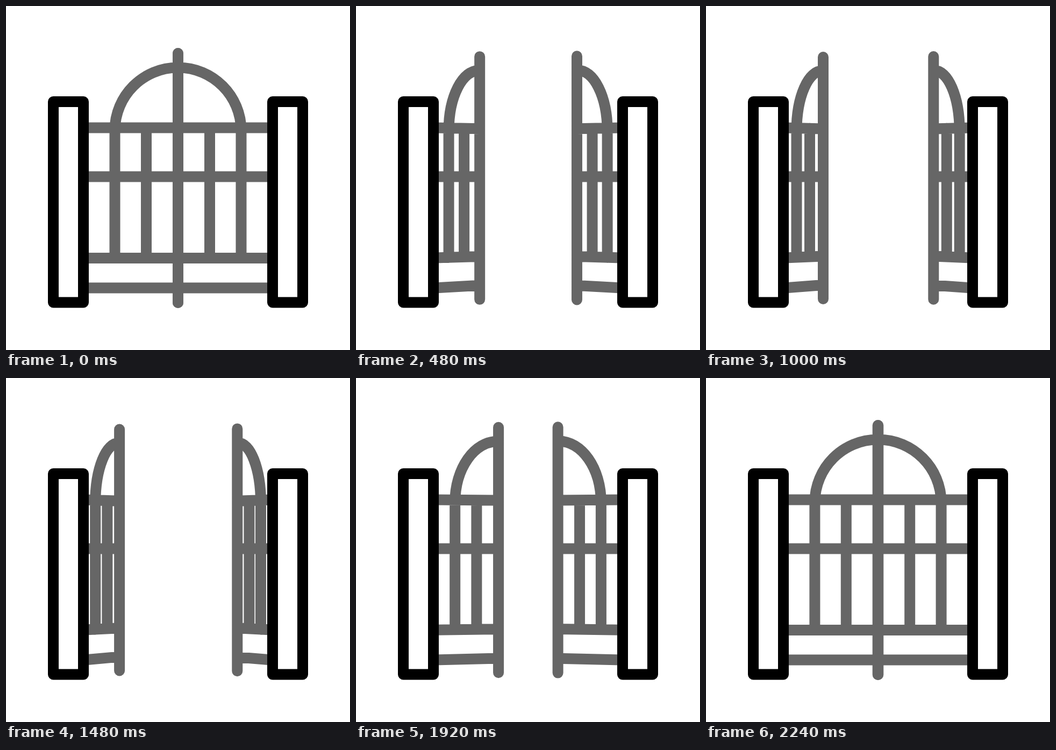
An HTML page for the animation above (2.28 s loop, 640 px wide and 640 px high).

```html
<!DOCTYPE html>
<html lang="en">
<head>
<meta charset="utf-8">
<title>Gate</title>
<style>
  html, body {
    margin: 0;
    width: 100%;
    height: 100%;
    overflow: hidden;
    background: #fff;
  }
  svg {
    display: block;
    width: 100vw;
    height: 100vh;
  }
  path, rect {
    fill: none;
    stroke-width: 20;
    stroke-linecap: round;
    stroke-linejoin: round;
  }
  rect { stroke: #000; }

  /* Order of parts: post, four rails, two pickets, arch */
  .gate {
    stroke: #666;
    d: var(--shut);
    animation: swing 2280ms infinite;
  }
  .left {
    --shut: path("M320 88V552 M146 226.5L320 226.5 M146 317.5L320 317.5 M146 469L320 469 M146 524.5L320 524.5 M202.5 226.5L202.5 469 M261 226.5L261 469 M202.5 232C202.5 167.1 255.1 114.5 320 114.5");
    --open: path("M218 95V545 M146 226.5L218 228.5 M146 317.5L218 317.5 M146 468.5L218 465.5 M146 524.5L218 519 M168.5 227.2L168.5 467.8 M193 227.8L193 466.6 M168.5 232.6C168.5 168.6 190.7 118.3 218 120.7");
  }
  .right {
    --shut: path("M320 88V552 M494 226.5L320 226.5 M494 317.5L320 317.5 M494 469L320 469 M494 524.5L320 524.5 M437.5 226.5L437.5 469 M379 226.5L379 469 M437.5 232C437.5 167.1 384.9 114.5 320 114.5");
    --open: path("M423.3 94V545.7 M494 226.5L423.3 228.5 M494 317.5L423.3 317.5 M494 468.5L423.3 465.5 M494 524.5L423.3 519.5 M471.7 227.2L471.7 467.8 M447.8 227.8L447.8 466.6 M471.7 232.6C471.7 168.6 450 118 423.3 120.2");
  }

  /* Opens past its rest pose and settles; leans back before closing */
  @keyframes swing {
    0% {
      d: var(--shut);
      animation-timing-function: cubic-bezier(.52, 0, .25, 1.45);
    }
    42.98% {
      d: var(--open);
      animation-timing-function: linear;
    }
    56.36% {
      d: var(--open);
      animation-timing-function: cubic-bezier(.8, -.4, .49, 1);
    }
    100% { d: var(--shut); }
  }
</style>
</head>
<body>
<svg viewBox="0 0 640 640">
  <path class="gate left"/>
  <path class="gate right"/>
  <rect x="88" y="178" width="56" height="373.5"/>
  <rect x="496" y="178" width="56" height="373.5"/>
</svg>
</body>
</html>
```
